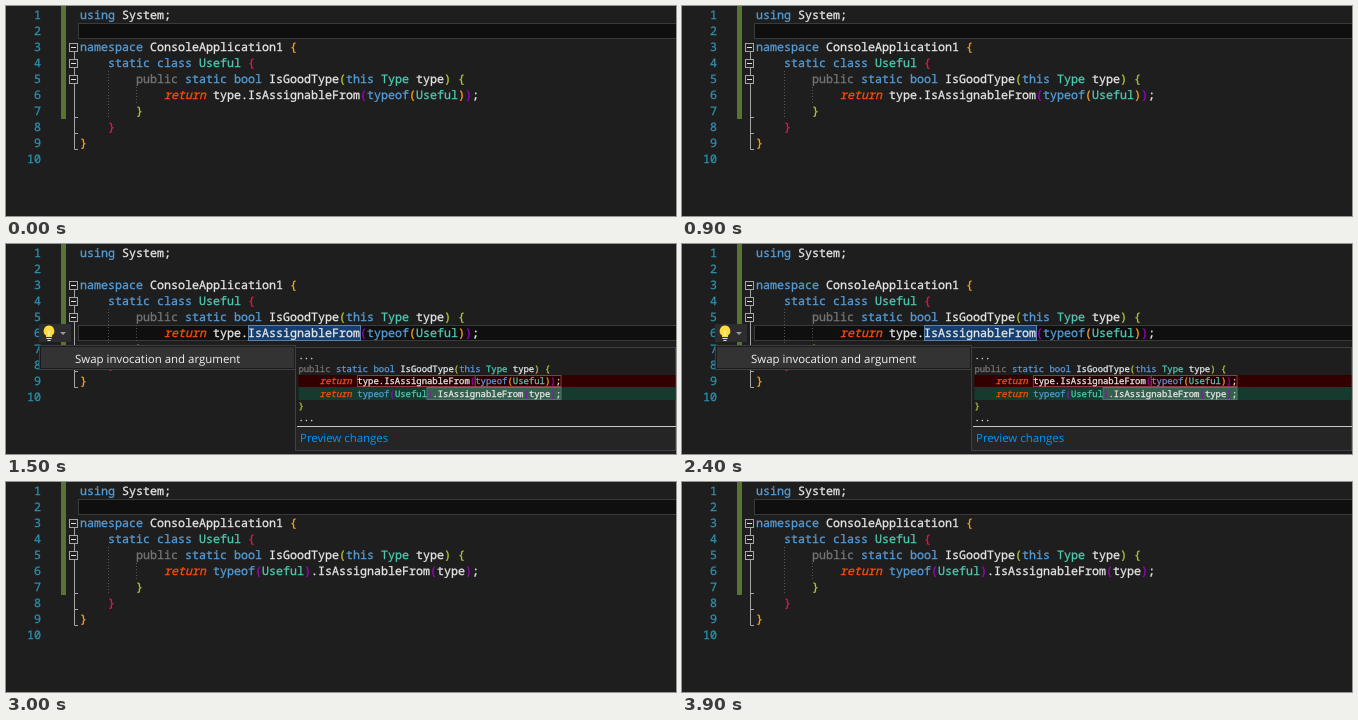
An HTML page for the animation above (4500 ms loop, 670x210 px).

```html
<!DOCTYPE html>
<html lang="en">
<head>
<meta charset="utf-8">
<title>Swap invocation and argument</title>
<style>
  html, body { margin: 0; width: 100%; height: 100%; overflow: hidden; background: #1e1e1e; }
  svg { display: block; }
  text { white-space: pre; text-rendering: geometricPrecision; }
  .code { font-family: "Noto Sans Mono", "DejaVu Sans Mono", monospace; stroke-width: 0.3px; }
  .ui { font: 11.45px "Open Sans", "Noto Sans", sans-serif; }
</style>
</head>
<body>
<svg id="stage" width="670" height="210" viewBox="0 0 670 210"></svg>
<script>
const STEP = 1500;
const PLAIN = "#e6e6e6", BLUE = "#569cd6", TEAL = "#4ec9b0";
const BRACKETS = ["#ffa11a", "#e8174b", "#b4c832", "#a000c8"];
const LEFT = 74, ADVANCE = 7, ROW = 16;

const COLORS = { public: "#757575", return: "#ff4a0a", Useful: TEAL, Type: TEAL };
for (const word of ["using", "namespace", "static", "class", "bool", "this", "typeof"]) {
  COLORS[word] = BLUE;
}

const BEFORE = "return type.IsAssignableFrom(typeof(Useful));";
const AFTER = "return typeof(Useful).IsAssignableFrom(type);";
const SIGNATURE = "public static bool IsGoodType(this Type type) {";

const stage = document.getElementById("stage");

function add(parent, tag, attrs = {}, content = "") {
  const node = document.createElementNS("http://www.w3.org/2000/svg", tag);
  for (const key in attrs) node.setAttribute(key, attrs[key]);
  node.textContent = content;
  parent.append(node);
  return node;
}

function rect(parent, x, y, width, height, fill, stroke) {
  const attrs = { x, y, width, height, fill };
  if (stroke) attrs.stroke = stroke;
  return add(parent, "rect", attrs);
}

function path(parent, d, stroke, extra = {}) {
  return add(parent, "path", { d, stroke, fill: "none", ...extra });
}

// Draws one line on a fixed column grid; brackets are coloured by nesting depth.
function code(parent, line, x, y, advance, depth = 0) {
  for (const match of line.matchAll(/\w+|[(){}]|[^\w\s(){}]+/g)) {
    const token = match[0];
    let fill = COLORS[token] || PLAIN;
    if (/[({]/.test(token)) fill = BRACKETS[depth++ % BRACKETS.length];
    if (/[)}]/.test(token)) fill = BRACKETS[--depth % BRACKETS.length];
    const attrs = {
      class: "code", x: x + match.index * advance, y, fill, stroke: fill,
      "font-size": advance / 0.6
    };
    if (token === "return") attrs["font-style"] = "italic";
    add(parent, "text", attrs, token);
  }
}

const baseline = row => 13 + (row - 1) * ROW;

function currentLine(parent, row) {
  rect(parent, 72.5, (row - 1) * ROW + 1.5, 600, 15, "#0f0f0f", "#3a3a3a");
}

function editor(parent, statement) {
  rect(parent, 55, 0, 5, 113, "#577430");
  for (let row = 1; row <= 10; row++) {
    add(parent, "text", {
      class: "code", x: 35, y: baseline(row), fill: "#2b91af", stroke: "#2b91af",
      "font-size": ADVANCE / 0.6, "text-anchor": "end"
    }, row);
  }

  path(parent, "M68.5 46V143.5H72M68.5 111.5H72M68.5 127.5H72", "#a5a5a5");
  for (const y of [37.5, 53.5, 69.5]) {
    rect(parent, 63.5, y, 8, 8, "#1e1e1e", "#a5a5a5");
    path(parent, `M65 ${y + 4}H70`, "#e0e0e0");
  }
  path(parent, "M102.5 65V113M130.5 81V97", "#555", { "stroke-dasharray": "1 2" });

  const lines = [
    [1, 0, "using System;", 0],
    [3, 0, "namespace ConsoleApplication1 {", 0],
    [4, 4, "static class Useful {", 1],
    [5, 8, SIGNATURE, 2],
    [6, 12, statement, 3],
    [7, 8, "}", 3],
    [8, 4, "}", 2],
    [9, 0, "}", 1]
  ];
  for (const [row, indent, line, depth] of lines) {
    code(parent, line, LEFT + indent * ADVANCE, baseline(row), ADVANCE, depth);
  }
}

function bulb(parent) {
  rect(parent, 33, 80, 32, 18, "#2d2d30");
  add(parent, "path", {
    d: "M43 81.5a5.5 5.5 0 0 1 3 10V93H40V91.5a5.5 5.5 0 0 1 3-10z", fill: "#ffdc3c"
  });
  path(parent, "M43 92V88L41 86.5M43 88L45 86.5", "#fff6cc");
  path(parent, "M40.5 94.5H45.5M41.5 96.5H44.5", "#e8e8e8");
  add(parent, "path", { d: "M54 88H60L57 91z", fill: "#999" });
}

function menu(parent) {
  rect(parent, 33.5, 101.5, 256, 24, "#1b1b1c", "#3f3f46");
  rect(parent, 35, 103, 253, 21, "#333334");
  add(parent, "text", { class: "ui", x: 69, y: 119, fill: "#f1f1f1" },
    "Swap invocation and argument");
}

function preview(parent) {
  const x = 292.4, advance = 5.36;
  const col = n => x + n * advance;
  rect(parent, 289.5, 103.5, 380, 103, "#1e1e1e", "#3f3f46");
  rect(parent, 290, 183, 379, 23, "#252526");
  rect(parent, x, 131, 377, 12, "#330000");
  rect(parent, x, 143, 377, 13, "#153a2e");
  for (const [from, to] of [[11, 33], [33, 49]]) {
    rect(parent, col(from), 131.5, (to - from) * advance, 11, "#260000", "#8c3c3c");
  }
  rect(parent, col(24), 143.5, 25 * advance, 12, "#35604e", "#4a7a66");

  const lines = [
    ["...", 0],
    [SIGNATURE, 2],
    ["    " + BEFORE, 3],
    ["    " + AFTER, 3],
    ["}", 3],
    ["...", 0]
  ];
  lines.forEach(([line, depth], i) => code(parent, line, x, 115.3 + i * 12.4, advance, depth));

  path(parent, "M291 182.5H670", "#c8c8c8");
  add(parent, "text", { class: "ui", x: 294, y: 198, fill: "#0097fb" }, "Preview changes");
}

function idle(statement) {
  const scene = add(stage, "g");
  currentLine(scene, 2);
  editor(scene, statement);
  return scene;
}

function suggestion() {
  const scene = add(stage, "g");
  currentLine(scene, 6);
  rect(scene, LEFT + 24 * ADVANCE + 0.5, 81.5, 16 * ADVANCE, 15, "#143f70", "#5a82ac");
  editor(scene, BEFORE);
  bulb(scene);
  menu(scene);
  preview(scene);
  return scene;
}

rect(stage, 0, 0, 670, 210, "#1e1e1e");
const scenes = [idle(BEFORE), suggestion(), idle(AFTER)];
const start = performance.now();

function draw() {
  const time = Math.max(0, performance.now() - start);
  const active = Math.floor(time / STEP) % scenes.length;
  scenes.forEach((scene, i) => {
    scene.style.display = i === active ? "" : "none";
  });
  requestAnimationFrame(draw);
}
draw();
</script>
</body>
</html>
```
